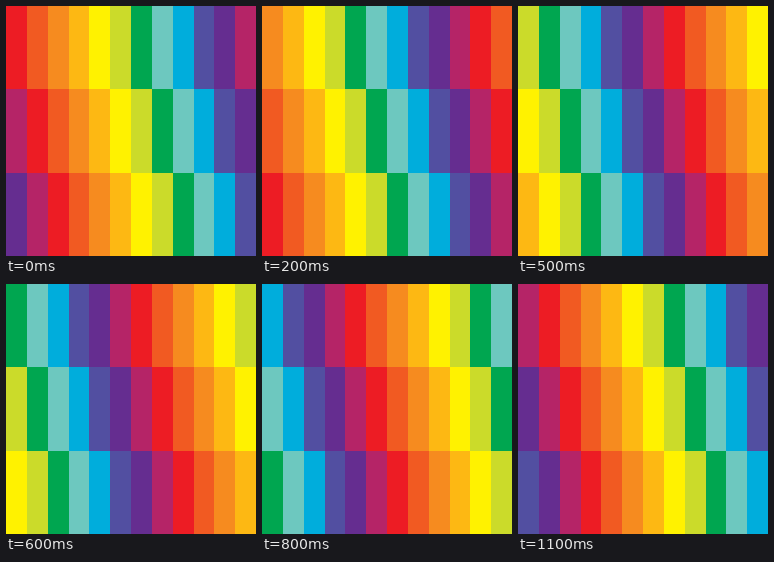
Recreate the animation shown at these times as an HTML page. Size 250 px wide and 250 px high, loop 1.2 s.

```html
<!DOCTYPE html>
<html lang="en">
<head>
<meta charset="utf-8">
<title>Rainbow shift</title>
<style>
  html, body { margin: 0; width: 100%; height: 100%; overflow: hidden; }
  svg { display: block; width: 100%; height: 100%; }
</style>
</head>
<body>
<svg id="stage" viewBox="0 0 250 250" shape-rendering="crispEdges"></svg>
<script>
const COLORS = [
  '#ed1c24', '#f15a22', '#f68b1f', '#fdb813', '#fff200', '#cbdb2a',
  '#00a650', '#6dc8bf', '#00addc', '#524fa1', '#652d90', '#b52467'
];
const SIZE = 250, ROWS = 3, COLS = COLORS.length, STEP_MS = 100;
const stage = document.getElementById('stage');
const edge = (index, count) => Math.round(index * SIZE / count);

function addCell(row, col) {
  const rect = document.createElementNS('http://www.w3.org/2000/svg', 'rect');
  const x = edge(col, COLS), y = edge(row, ROWS);
  const box = { x, y, width: edge(col + 1, COLS) - x, height: edge(row + 1, ROWS) - y };
  for (const name in box) rect.setAttribute(name, box[name]);
  stage.append(rect);
  return { rect, offset: col - row + COLS };
}

const cells = [];
for (let row = 0; row < ROWS; row++) {
  for (let col = 0; col < COLS; col++) cells.push(addCell(row, col));
}

// Each step moves every color one column to the left; rows trail by one.
function draw(time) {
  const step = Math.floor(time / STEP_MS) % COLS;
  for (const { rect, offset } of cells) {
    rect.setAttribute('fill', COLORS[(offset + step) % COLS]);
  }
}

const start = performance.now();
function tick() {
  draw(performance.now() - start);
  requestAnimationFrame(tick);
}
tick();
</script>
</body>
</html>
```
